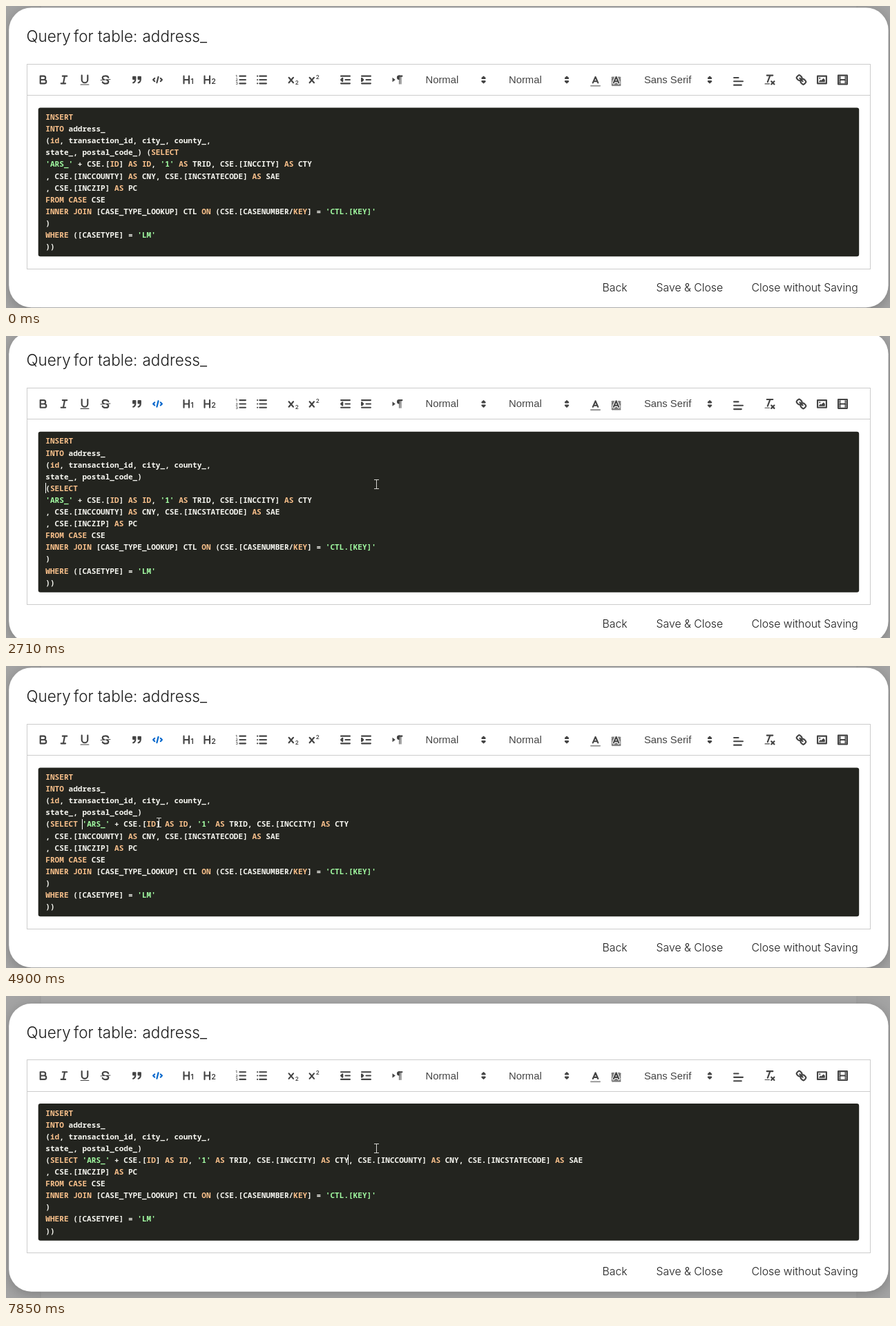
An HTML page that plays this animation: 1280 px wide and 438 px high, repeating every 8000 ms.

```html
<!DOCTYPE html>
<html lang="en">
<head>
<meta charset="utf-8">
<title>Query editor</title>
<style>
  html, body { margin: 0; width: 100%; height: 100%; overflow: hidden; background: #a4a4a4; }
  svg { display: block; width: 100vw; height: 100vh; }
  .ui { font-family: Inter, "Open Sans", sans-serif; font-weight: 300; fill: #1c1c1c; }
  .title { font-size: 22.5px; }
  .actions { font-size: 15.8px; }
  .pick { font: 500 14.8px "Liberation Sans", Arial, sans-serif; fill: #444; }
  .code { font: 600 11.08px "Noto Sans Mono", "DejaVu Sans Mono", monospace; fill: #f8f8f2; white-space: pre; }
  .key { fill: #fcc28c; }
  .str { fill: #a2fca2; }
  .crisp { shape-rendering: crispEdges; }
  .icon { --ink: #444; }
  .icon.on { --ink: #06c; }
  .icon path { fill: none; stroke: var(--ink); stroke-width: 2; stroke-linecap: round; stroke-linejoin: round; }
  .icon text { font-family: Inter, sans-serif; font-weight: 600; fill: var(--ink); }
  .icon .thin { stroke-width: 1; }
  .icon .solid { fill: var(--ink); stroke: none; }
  .icon .halo { stroke: #fff; stroke-width: 4; }
  .icon .swatch { stroke: #999; }
  #modal { fill: #fff; filter: drop-shadow(0 4px 9px rgba(0, 0, 0, .22)); }
</style>
</head>
<body>
<svg viewBox="0 0 1280 438" preserveAspectRatio="none">
  <rect width="1280" height="438" fill="#a4a4a4"/>
  <rect x="50" y="-10" width="1182" height="460" fill="#a9a9a9" stroke="#9d9d9d"/>
  <rect id="modal" x="4.2" width="1273.4" rx="32.5"/>
  <rect id="frame" class="crisp" x="30.5" width="1221" fill="none" stroke="#ccc"/>
  <rect id="panel" x="46.7" width="1188.500" rx="3.2" fill="#23241f"/>
  <g id="top">
    <text class="ui title" y="52"><tspan x="29.500">Query</tspan><tspan x="98">for</tspan><tspan x="133">table:</tspan><tspan x="197.500">address_</tspan></text>
    <path class="crisp" d="M30 129.5H1252" stroke="#ccc"/>
    <g id="tools"></g>
    <g id="code" class="code"></g>
    <rect id="caret" class="crisp" width="1" height="15" fill="#fff"/>
  </g>
  <g id="bottom" class="ui actions">
    <text x="863.5" y="414">Back</text>
    <text x="941.5" y="414">Save &amp; Close</text>
    <text x="1079.5" y="414">Close without Saving</text>
  </g>
  <g id="pointer">
    <path id="beam" d="M-3.5-6.5h7M0-6.500v13M-3.5 6.500h7" fill="none" stroke="#d4d4d0"/>
    <path id="arrow" d="M-5-6v16l4-4h7Z" fill="#fff" stroke="#222"/>
  </g>
</svg>
<script>
const LOOP = 8000, LINE = 17.1, CHAR = 6.65, LEFT = 57.3, BASE = 165;
const $ = id => document.getElementById(id);
const set = (el, attrs) => { for (const k in attrs) el.setAttribute(k, attrs[k]); };

// Icons are drawn in an 18-unit box
const path = (d, kind = '') => `<path class="${kind}" d="${d}"/>`;
const thin = d => path(d, 'thin'), solid = d => path(d, 'solid');
const digit = (n, x, y, size) => `<text x="${x}" y="${y}" font-size="${size}">${n}</text>`;
const rows = (starts, ends) => path(starts.map((x, i) => `M${x} ${4 + 5 * i}H${ends[i]}`).join(''));
const spread = (n, fn) => Array.from({ length: n }, (_, i) => fn(i)).join('');

const heading = n => path('M2 4v10M9 4v10M2 9h7') + digit(n, 11, 14.5, 10);
const script = (n, y) => path('M3 6l6 7M9 6l-6 7') + digit(n, 11.6, y, 7.5);
const quote = x => path(`M${x} 5h3v3h-3ZM${x + 3} 8q0 4-3 5`) + solid(`M${x} 5h3v3h-3Z`);
const indent = wedge => rows([3, 9, 3], [15, 15, 15]) + path(wedge);
const letterA = 'M5.5 11L9 3l3.5 8M6.4 9h5.2';
const arrows = path('M7 11l2 2 2-2ZM7 7l2-2 2 2Z');
const hatch = spread(12, i => {
  const c = 2 * i + 1, a = 3 + Math.max(0, c - 12), b = 3 + Math.min(c, 12);
  return `M${a} ${b}L${b} ${a}`;
});
const chain = 'M9 9a3.4 3.4 0 0 1-4.500 0C2 6.500 2 6 4 4S6.500 2 9 4.500A3.400 3.400 0 0 1 9 9';

const icons = {
  bold: path('M5 4h4.5a2.5 2.5 0 0 1 0 5H5ZM5 9h5.5a2.5 2.5 0 0 1 0 5H5Z'),
  italic: path('M7 4h6M5 14h6M8 14l2-10'),
  underline: path('M5 3v6a4 4 0 0 0 8 0V3') + thin('M3.5 15.5h11'),
  strike: path('M13 6C12 3 5 3 5 6.5q0 1.500 2 2M5 12c1 3 8 3 8-.5q0-1.500-2-2') + thin('M15.5 8.5l-13 1'),
  quote: quote(4) + quote(11),
  code: path('M5 7L3 9l2 2M13 7l2 2-2 2M10 5L8 13'),
  h1: heading(1),
  h2: heading(2),
  ordered: rows([7, 7, 7], [15, 15, 15]) + spread(3, i => digit(i + 1, 1.6, 6 + 5 * i, 5)),
  bullet: rows([6, 6, 6], [15, 15, 15]) + rows([3, 3, 3], [3, 3, 3]),
  sub: script(2, 16),
  sup: script(2, 8),
  outdent: indent('M5 7v4L3 9Z'),
  indent: indent('M3 7v4l2-2Z'),
  direction: solid('M2 6l4 3-4 3ZM11 3a3 3 0 0 0 0 6h1V3Z') + path('M11 4h4') + thin('M11.5 4v10.500M13.5 4v10.500'),
  color: path(letterA) + path('M3 15h12', 'swatch'),
  back: thin(hatch) + path(letterA, 'halo') + path(letterA),
  align: rows([3, 3, 3], [9, 15, 13]),
  clean: path('M5 3h8M6 12l3.4-9M11 11l4 4M15 11l-4 4') + thin('M2.5 14.500h6'),
  link: path(chain) + `<g transform="rotate(180 9 9)">${path(chain)}</g>` + path('M7 7l4 4'),
  image: path('M3 4h12v10H3Z') + solid('M5 12v-1l2-2 1 1 3-3 2 2v3ZM5 7a1 1 0 0 1 2 0 1 1 0 0 1-2 0'),
  video: path('M3 3h12v12H3ZM6 9h6') + thin('M5.5 3v12M12.5 3v12' + spread(4, i => `M3 ${5.5 + 2.3 * i}h3m6 0h3`))
};

// Buttons flow from the left; a group with a width is a drop-down
const groups = [
  'bold italic underline strike', 'quote code', 'h1 h2', 'ordered bullet', 'sub sup',
  'outdent indent', 'direction', ['Normal', 105], ['Normal', 105], 'color back',
  ['Sans Serif', 116], 'align', 'clean', 'link image video'
];
const lowered = ['color', 'back', 'align'];

function toolbar() {
  const BUTTON = 30, GAP = 15.5;
  const place = (art, x, y, id = '') =>
    `<g class="icon" id="${id}" transform="translate(${x} ${y}) scale(1.07) translate(-9 -9)">${art}</g>`;
  let x = 39, out = '';
  for (const group of groups) {
    if (Array.isArray(group)) {
      const [label, width] = group;
      out += `<text class="pick" x="${x + 10}" y="112">${label}</text>`;
      x += width;
      out += place(arrows, x - 11, 107);
    } else {
      for (const name of group.split(' ')) {
        out += place(icons[name], x + BUTTON / 2, lowered.includes(name) ? 109.3 : 107, name);
        x += BUTTON;
      }
    }
    x += GAP;
  }
  return out;
}
$('tools').innerHTML = toolbar();

// Query text and its edits
const head = 'INSERT\nINTO address_\n(id, transaction_id, city_, county_,\nstate_, postal_code_)';
const tail = `'ARS_' + CSE.[ID] AS ID, '1' AS TRID, CSE.[INCCITY] AS CTY
, CSE.[INCCOUNTY] AS CNY, CSE.[INCSTATECODE] AS SAE
, CSE.[INCZIP] AS PC
FROM CASE CSE
INNER JOIN [CASE_TYPE_LOOKUP] CTL ON (CSE.[CASENUMBER/KEY] = 'CTL.[KEY]'
)
WHERE ([CASETYPE] = 'LM'
))`;
const edits = [
  [0, `${head} (SELECT\n${tail}`],
  [2710, `${head}\n(SELECT\n${tail}`],
  [4900, `${head}\n(SELECT ${tail}`],
  [7850, `${head}\n(SELECT ${tail.replace('\n', '')}`]
];
const token = /('[^']*')|\b(INSERT|INTO|id|ID|SELECT|AS|FROM|CASE|INNER|JOIN|ON|KEY|WHERE)\b/g;
const paint = s => s.replace(token, (m, str) => `<tspan class="${str ? 'str' : 'key'}">${m}</tspan>`);

// Caret placements: time, line, column; it blinks from each one on
const BLINK = 525, FOCUS = 1530;
const carets = [[FOCUS, 3, 22], [2710, 4, 0], [3700, 4, 7], [4680, 4, 8], [6720, 4, 66]];

// Pointer moves: start, end, target; each begins where the last one stopped
const TICK = 110;
const origin = [1080, 450];
const moves = [
  [100, 550, 480, 223],
  [650, 880, 304, 250],
  [980, 1310, 202, 212],
  [1640, 1860, 536, 215],
  [2830, 3390, 220, 216],
  [3600, 3810, 221, 227],
  [5540, 5660, 410, 228],
  [5970, 6630, 545, 217],
  [6870, 7080, 536, 221]
];

const at = (list, t) => list.filter(e => e[0] <= t).pop();

function pointerAt(t) {
  const move = at(moves, t);
  if (!move) return null;
  const [start, end, ...to] = move;
  const prev = moves[moves.indexOf(move) - 1];
  const from = prev ? prev.slice(2) : origin;
  const steps = Math.round((end - start) / TICK) + 1;
  const p = Math.min(1, (Math.floor((t - start) / TICK) + 1) / steps);
  return from.map((v, i) => v + (to[i] - v) * p);
}

let shown;
function showText(text) {
  if (text === shown) return;
  shown = text;
  const lines = text.split('\n');
  // The dialog stays centred as its line count changes
  const dy = (12 - lines.length) * LINE / 2;
  $('code').innerHTML = lines.map((s, i) =>
    `<text x="${LEFT}" y="${BASE + i * LINE}">${paint(s)}</text>`).join('');
  set($('modal'), { y: 2.4 + dy, height: 434.8 - 2 * dy });
  set($('frame'), { y: 84.3 + dy, height: 297 - 2 * dy });
  set($('panel'), { y: 147.4 + dy, height: 215.8 - 2 * dy });
  set($('top'), { transform: `translate(0 ${dy})` });
  set($('bottom'), { transform: `translate(0 ${-dy})` });
}

function showCaret(t) {
  const caret = at(carets, t);
  set($('caret'), { visibility: caret && Math.floor((t - caret[0]) / BLINK) % 2 === 0 ? 'visible' : 'hidden' });
  if (!caret) return;
  const [, line, col] = caret;
  set($('caret'), { x: Math.floor(57 + col * CHAR), y: BASE + line * LINE - 11.6 });
}

function showPointer(t) {
  const pos = pointerAt(t);
  set($('pointer'), { visibility: pos ? 'visible' : 'hidden' });
  if (!pos) return;
  const [x, y] = pos, overText = y < 364;
  set($('pointer'), { transform: `translate(${Math.floor(x) + .5} ${Math.floor(y)})` });
  set($('beam'), { opacity: overText ? 1 : 0 });
  set($('arrow'), { opacity: overText ? 0 : 1 });
}

function draw() {
  const t = performance.now() % LOOP;
  showText(at(edits, t)[1]);
  $('code').classList.toggle('on', t >= FOCUS);
  document.querySelector('.icon#code-button')?.classList.toggle('on', t >= FOCUS);
  showCaret(t);
  showPointer(t);
  requestAnimationFrame(draw);
}
// Keep the button's id apart from the text block's
document.querySelector('#tools #code').id = 'code-button';
draw();
</script>
</body>
</html>
```
